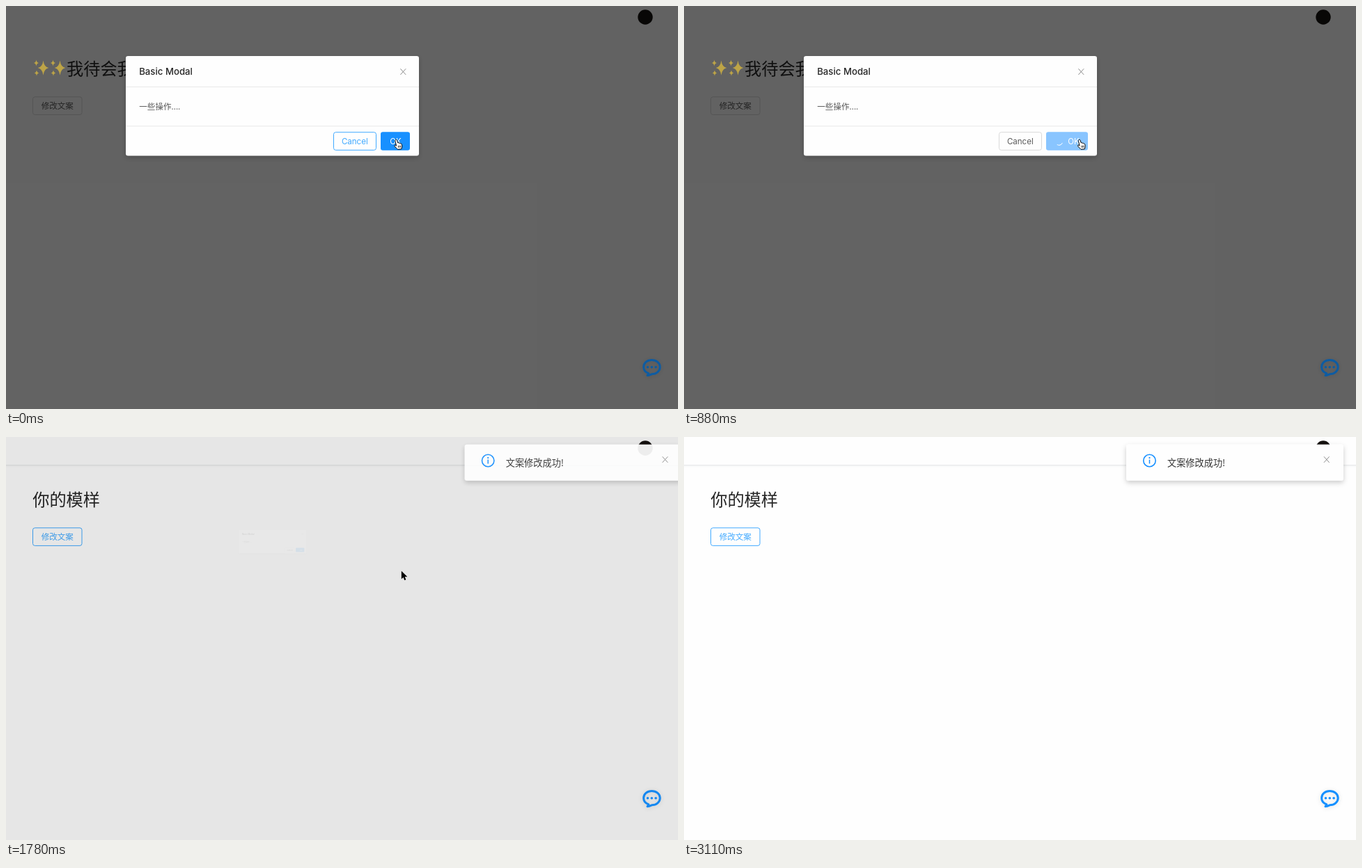
An HTML page for the animation above (3.56 s loop, 965 by 580 pixels).

```html
<!DOCTYPE html>
<html lang="zh">
<head>
<meta charset="utf-8">
<title>Modal and notice</title>
<style>
html, body { margin: 0; width: 100%; height: 100%; overflow: hidden; background: #fefefe; }
svg { display: block; width: 100%; height: 100%; }
text { font-family: 'Noto Sans CJK SC', 'Noto Sans CJK', sans-serif; font-size: 11.55px; fill: #595959; }
.latin { font-family: Inter, Roboto, sans-serif; }
.mid { text-anchor: middle; }
.line { fill: none; stroke-linecap: round; stroke-linejoin: round; }
</style>
</head>
<body>
<svg viewBox="0 0 965 580">
  <defs>
    <filter id="soft" x="-20%" y="-40%" width="140%" height="200%">
      <feDropShadow dx="0" dy="3" stdDeviation="3.5" flood-opacity=".2"/>
    </filter>
    <filter id="glow" x="-40%" y="-40%" width="180%" height="180%">
      <feDropShadow dx="0" dy="1" stdDeviation="3" flood-opacity=".12"/>
    </filter>
    <path id="star" d="M0-1Q.14-.14 1 0Q.14.14 0 1Q-.14.14-1 0Q-.14-.14 0-1Z"/>
    <g id="sparkle">
      <use href="#star" transform="translate(14.5 12) scale(7.8 10.5)"/>
      <use href="#star" transform="translate(4.5 5) scale(3.6 4.4)"/>
      <use href="#star" transform="translate(5 19.5) scale(3.4 4.2)"/>
    </g>
    <path id="cross" class="line" d="M-3.6-4L3.6 4M3.6-4L-3.6 4" stroke="#8c8c8c" stroke-width="1"/>
  </defs>

  <rect width="965" height="580" fill="#fefefe"/>
  <g id="header">
    <rect y="40" width="965" height="1.4" fill="#e6e8e9"/>
    <rect y="41.4" width="965" height="2" fill="#f8f9f9"/>
  </g>
  <circle cx="918" cy="16" r="10.7" fill="#15110f"/>
  <text id="before" x="87" y="98.5" style="font-size:24.2px;fill:#262626">我待会我</text>
  <text id="after" x="38.2" y="98.5" style="font-size:24.2px;fill:#262626">你的模样</text>
  <rect id="editBox" x="38.5" y="130.8" width="70.5" height="25.6" rx="3" fill="none"/>
  <text id="editText" class="mid" x="73.8" y="148.4">修改文案</text>

  <rect id="mask" width="965" height="580"/>
  <g id="sparkles" fill="#bda447">
    <use href="#sparkle" x="39" y="77"/>
    <use href="#sparkle" x="63" y="77"/>
  </g>
  <g id="chat" filter="url(#glow)">
    <path class="line" stroke-width="3" d="M921 531.8L922.8 528.7C918.5 527.4 915.6 524 915.6 519.6C915.6 513.7 920.6 509.4 927.3 509.4S939.2 513.7 939.2 519.6S934 529.8 927.3 529.8Q923.5 531.7 921 531.8"/>
    <circle cx="921.5" cy="519.8" r="1.8"/>
    <circle cx="927.3" cy="519.8" r="1.8"/>
    <circle cx="933.1" cy="519.8" r="1.8"/>
  </g>

  <g id="modal">
    <rect x="172" y="72" width="421" height="143.5" rx="3.3" fill="#fefefe" filter="url(#soft)"/>
    <path d="M172 116.4H593M172 172.9H593" stroke="#e8e8e8"/>
    <text class="latin" x="191.2" y="98.8" style="font-size:13.2px;font-weight:500;fill:#262626">Basic Modal</text>
    <use href="#cross" x="570.3" y="94.6"/>
    <text x="191.3" y="149.3">一些操作....</text>
    <g id="cancel">
      <rect id="cancelBox" x="-67.5" y="181.7" width="61" height="25.7" rx="3" fill="#fefefe"/>
      <text id="cancelText" class="latin mid" x="-37.2" y="199.2">Cancel</text>
    </g>
    <rect id="wave" y="177.5" height="33.7" rx="6" fill="#1890ff" opacity=".1"/>
    <rect id="ok" y="181.3" height="26.4" rx="3.3"/>
    <path id="spin" class="line" d="M538.5 189.8A5.2 5.2 0 0 1 543.7 195" stroke="#fff" stroke-width="1"/>
    <text class="latin" x="551.2" y="199.2" style="fill:#fff">OK</text>
  </g>

  <g id="notice">
    <rect x="635" y="10.8" width="312" height="52" rx="3.3" fill="#fefefe" filter="url(#soft)"/>
    <circle cx="668.5" cy="34" r="8.7" fill="none" stroke="#1890ff" stroke-width="1.6"/>
    <path d="M668.5 32.6V38.4" stroke="#1890ff" stroke-width="1.5"/>
    <circle cx="668.5" cy="29.9" r="1.1" fill="#1890ff"/>
    <text x="694" y="41.6" style="font-size:13.2px;fill:#333">文案修改成功!</text>
    <use href="#cross" x="922.8" y="32.5"/>
  </g>

  <g id="hand">
    <path fill="#fff" stroke="#000" d="M3.4 1.2C4.3.9 5 1.4 5.2 2.2L6.2 5.6C7 5.2 8 5.4 8.2 6.2C9 5.8 10 6.1 10.2 6.9C11 6.7 11.7 7.2 11.9 8.2L12.2 10.5C12.3 12 11.6 13 11.2 14.6L6 15C4.8 13.6 3 12.3 1.5 10.2C1 9.3 2 8.6 2.9 9.1L4 9.9L2.5 3C2.3 2 2.6 1.4 3.4 1.2Z"/>
    <path d="M6.7 9.6L7.1 12.6M8.4 9.5L8.7 12.5M10 9.4L10.2 12.4" stroke="#000" stroke-width=".7"/>
  </g>
  <path id="arrow" d="M0 0V11.8L2.7 9.3L4.5 13.4L6.6 12.5L4.9 8.5H8.6Z" stroke="#fff" stroke-width=".8" paint-order="stroke"/>
</svg>
<script>
const LOOP = 3560;
const BLUE = [64, 169, 255], GREY = [217, 217, 217], TEXT = [89, 89, 89];
const $ = id => document.getElementById(id);
const set = (id, attrs) => { for (const k in attrs) $(id).setAttribute(k, attrs[k]); };
const show = (id, on) => set(id, { visibility: on ? 'visible' : 'hidden' });
const mix = (a, b, k) => `rgb(${a.map((v, i) => Math.round(v + (b[i] - v) * k))})`;

const steps = [
  { t: 0, left: 538, ok: '#1890ff', focus: 1, hand: 556.5, mask: .61, scale: 1, fade: 1 },
  { t: 150, ok: '#1180ee', focus: .5 },
  { t: 300, ok: '#096dd9', focus: 0, hand: 564 },
  { t: 590, left: 531.3, ok: '#68a3e9' },
  { t: 740, left: 525, ok: '#78b4f5' },
  { t: 880, left: 520, ok: '#89c5ff' },
  { t: 1030, hand: 0, arrow: [567.8, 192.8] },
  { t: 1180 }, { t: 1330 }, { t: 1480 },
  { t: 1630, left: 527, ok: '#40a9ff', mask: .56, scale: .986, fade: .985 },
  { t: 1780, mask: .095, scale: .23, fade: .1, slide: 23.7 },
  { t: 1930, mask: 0, fade: 0, slide: 0 },
  { t: 2370, arrow: [594.8, 170.8] },
  { t: 2520, arrow: [624.8, 175.8] },
  { t: 2820, arrow: [938.8, 453.8] },
  { t: 3110, arrow: null }
];
for (let i = 1; i < steps.length; i++) steps[i] = { ...steps[i - 1], ...steps[i] };

function draw(time) {
  const s = steps.filter(p => p.t <= time).pop();
  const done = s.t >= 1630, notified = s.t >= 1780;

  show('header', done);
  show('after', done);
  show('before', !done);
  show('sparkles', !done);
  set('editBox', { stroke: mix(GREY, BLUE, +notified) });
  $('editText').style.fill = mix(TEXT, BLUE, +notified);
  set('mask', { 'fill-opacity': s.mask });
  const blue = mix([24, 144, 255], [0, 0, 0], s.mask * .6);
  set('chat', { fill: blue });
  $('chat').firstElementChild.setAttribute('stroke', blue);

  set('modal', {
    opacity: s.fade,
    transform: `translate(383 153) scale(${s.scale}) translate(-383 -153)`
  });
  set('cancel', { transform: `translate(${s.left} 0)` });
  set('cancelBox', { stroke: mix(GREY, BLUE, s.focus) });
  $('cancelText').style.fill = mix(TEXT, BLUE, s.focus);
  set('ok', { x: s.left, width: 580 - s.left, fill: s.ok });
  set('wave', { x: s.left - 3.7, width: 587.4 - s.left });
  show('wave', s.t === 740);
  set('spin', { transform: `rotate(${(s.t - 1180) * .36 + 225} 538.5 195)` });
  show('spin', s.t >= 590 && !done);

  show('notice', notified);
  set('notice', { transform: `translate(${s.slide || 0} 0)`, opacity: s.slide ? .93 : 1 });

  show('hand', s.hand);
  set('hand', { transform: `translate(${s.hand} 191.3)` });
  show('arrow', s.arrow);
  if (s.arrow) set('arrow', { transform: `translate(${s.arrow})` });
}

const start = performance.now();
function tick() {
  draw((performance.now() - start) % LOOP);
  requestAnimationFrame(tick);
}
tick();
</script>
</body>
</html>
```
